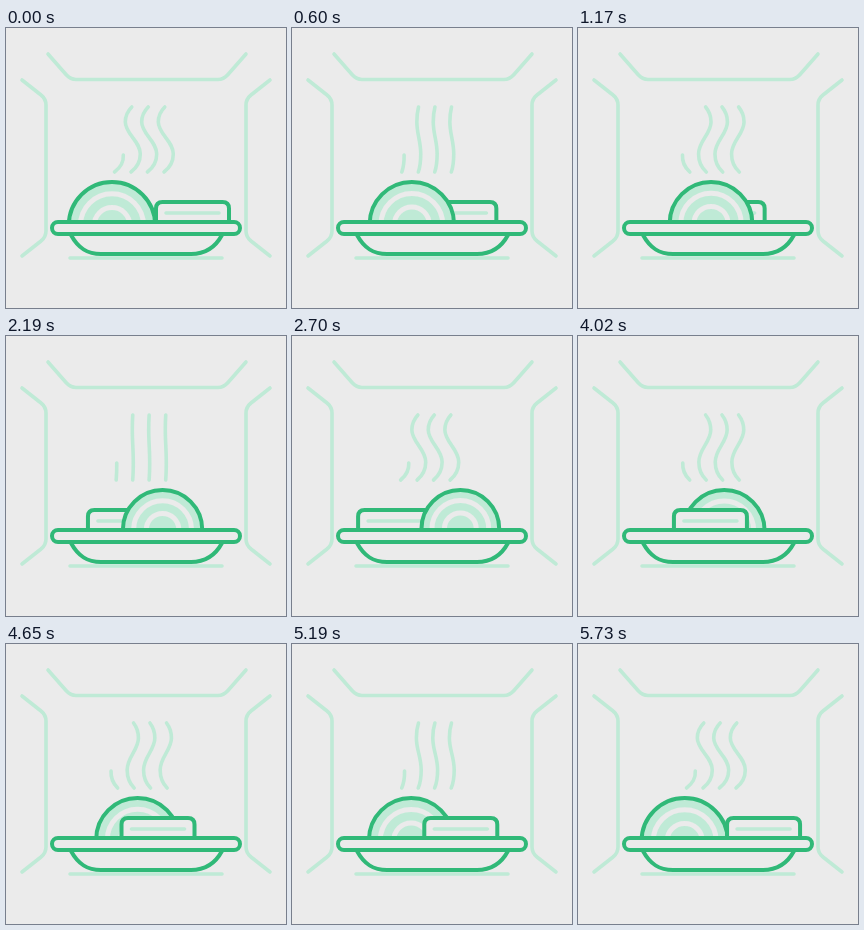
These frames come from a looping animation (280x280 px, 5.76 s). An HTML page:

```html
<!DOCTYPE html>
<html lang="en">
<head>
<meta charset="utf-8">
<title>Warming plate</title>
<style>
  html, body { margin: 0; width: 100%; height: 100%; overflow: hidden; background: #ebebeb; }
  svg { display: block; width: 100vw; height: 100vh; }
  path, rect, circle { fill: none; stroke-width: 4; stroke-linecap: round; stroke-linejoin: round; }
  .pale { stroke: #bfead6; stroke-width: 3.6; }
  .bold { stroke: #30b978; }
  .solid { fill: #ebebeb; }
  .dough { fill: #bfead6; }
  .ring { stroke: #ebebeb; stroke-width: 5; }
</style>
</head>
<body>
<svg viewBox="0 0 280 280">
  <defs><clipPath id="above"><rect x="0" y="0" width="280" height="200"/></clipPath></defs>
  <path class="pale" d="M42 26L60 46.500Q64.500 51.500 70 51.500H212Q217.500 51.500 222 46.500L240 26"/>
  <path class="pale" d="M16 52L35 67Q40 71 40 77V203Q40 209 35 213L16 228"/>
  <path class="pale" d="M264 52L245 67Q240 71 240 77V203Q240 209 245 213L264 228"/>
  <path class="pale" d="M64 230H216"/>
  <path class="pale" id="steam"/>
  <g id="food" clip-path="url(#above)">
    <g id="box">
      <path class="bold solid" d="M150 200V180.500Q150 174 156.500 174H216.500Q223 174 223 180.500V200"/>
      <path class="pale" d="M160 185H213"/>
    </g>
    <g id="dome">
      <circle class="bold dough"/>
      <circle class="ring"/>
      <circle class="ring"/>
    </g>
  </g>
  <path class="bold" d="M65 207C72 220 81 226 95 226H185C199 226 209 220 216 207"/>
  <rect class="bold solid" x="46" y="194" width="188" height="12" rx="6"/>
</svg>
<script>
const LOOP = 5760, HALF = LOOP / 2, STEP = 30;
const DOME_TOP = 154;
const RINGS = [1, 0.73, 0.41];
const PLUMES = [126.8, 143.2, 159.8];

const get = id => document.getElementById(id);
const food = get('food'), box = get('box'), dome = get('dome'), steam = get('steam');
const circles = [...dome.children];
const mix = (a, b, k) => a + (b - a) * k;

// One wavy plume around x; sway runs from 1 to -1 and mirrors the wave.
function plume(x, sway, short) {
  const p = (dx, y) => `${(x + dx * sway).toFixed(2)} ${y} `;
  const tail = 'C' + p(7.5, 134) + p(3.5, 140) + p(-1.8, 144);
  if (short) return 'M' + p(7, 127) + tail;
  return 'M' + p(-1, 79) + 'C' + p(-5, 83) + p(-7.5, 88) + p(-7.5, 94) +
    'C' + p(-7.5, 106) + p(7.5, 113) + p(7.5, 126) + tail;
}

function draw(t) {
  const k = 1 - Math.abs(1 - t / HALF);
  const r = mix(43.2, 38.6, k);
  circles.forEach((c, i) => {
    c.setAttribute('cx', mix(106, 172.5, k));
    c.setAttribute('cy', DOME_TOP + r);
    c.setAttribute('r', r * RINGS[i]);
  });
  box.setAttribute('transform', `translate(${-89.5 * k} 0)`);

  // The dome passes in front on the way out, the box on the way back.
  const front = t > 0 && t < HALF ? dome : box;
  if (food.lastElementChild !== front) food.appendChild(front);

  const sway = Math.cos(t / HALF * 2 * Math.PI);
  steam.setAttribute('d', plume(110.3, sway, true) + PLUMES.map(x => plume(x, sway)).join(''));
}

const start = performance.now();
function tick() {
  const t = (performance.now() - start) % LOOP;
  draw(Math.floor(t / STEP) * STEP);
  requestAnimationFrame(tick);
}
tick();
</script>
</body>
</html>
```
